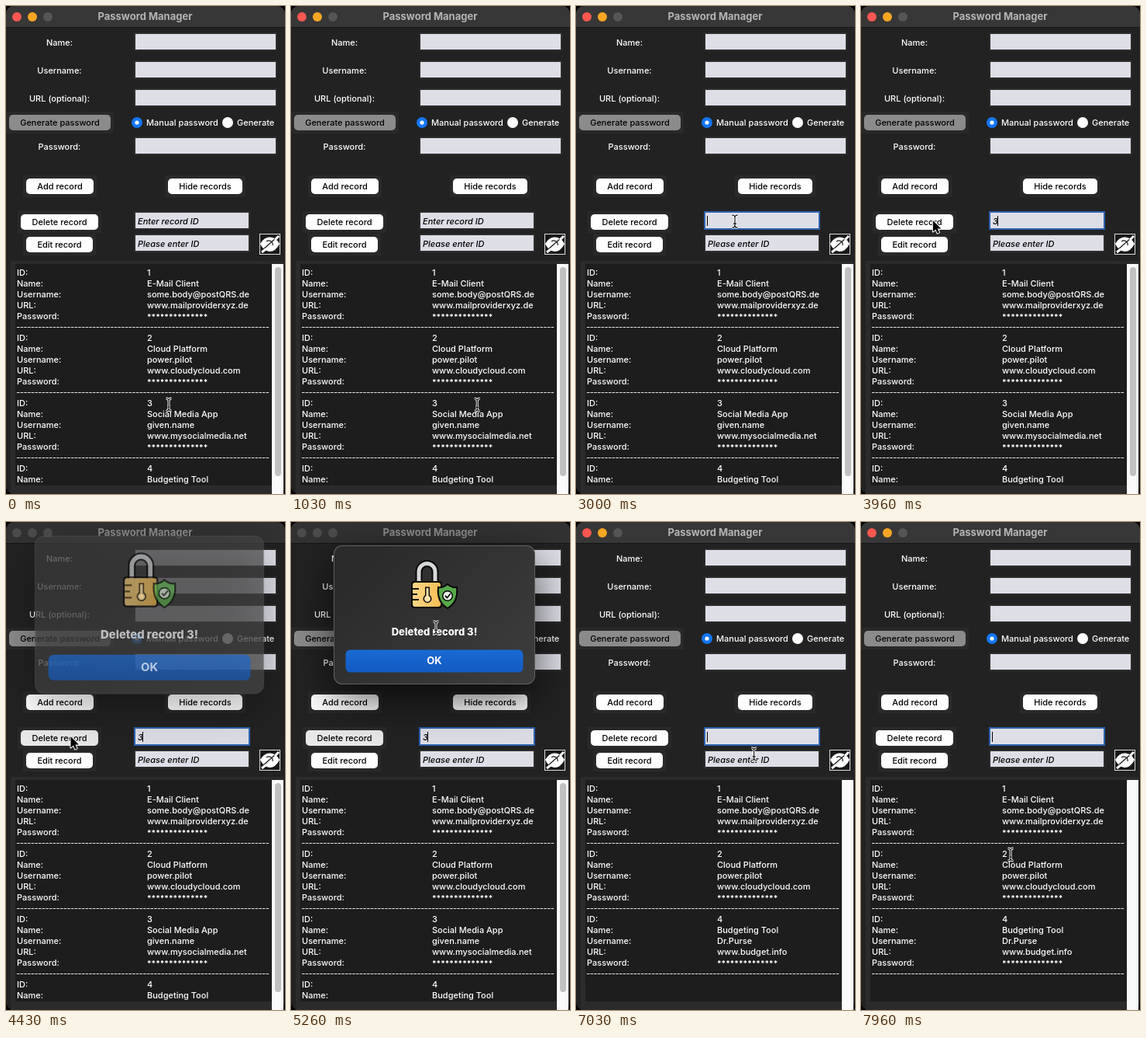
An HTML page with a canvas for the animation above (8000 ms loop, 360 by 628 pixels).

```html
<!DOCTYPE html>
<html lang="en">
<head>
<meta charset="utf-8">
<title>Password Manager</title>
<style>
  html, body { margin: 0; width: 100%; height: 100%; overflow: hidden; background: #000; }
  canvas { display: block; width: 360px; height: 628px; }
</style>
</head>
<body>
<canvas id="stage" width="360" height="628"></canvas>
<script>
const ctx = document.getElementById('stage').getContext('2d');
const LOOP = 8000;
const UI = '500 11px Inter, sans-serif';
const ITALIC = 'italic 500 11px Inter, sans-serif';
const BOLD = '700 13px Inter, sans-serif';
const HEAVY = '800 13px Inter, sans-serif';

const DIALOG_OPEN = 4370, DIALOG_CLOSE = 6570, DELETED = 6720;
const FOCUSED = 3000, TYPED = 3350;

// Pointer keyframes: time, x, y
const POINTER = [
  [0, 210, 513], [400, 224, 549], [830, 238, 528], [1200, 242, 502],
  [1660, 220, 526], [1780, 218, 522], [2160, 177, 402], [2560, 202, 284],
  [2900, 205, 277], [3500, 205, 279], [3940, 93, 276], [4250, 83.5, 276],
  [4650, 83.5, 276], [5240, 187, 136], [5500, 187, 138], [6100, 191.5, 172],
  [6650, 191.5, 172], [7150, 236, 320], [7600, 195, 428], [8000, 193, 428]
];

const RECORDS = [
  ['1', 'E-Mail Client', 'some.body@postQRS.de', 'www.mailproviderxyz.de'],
  ['2', 'Cloud Platform', 'power.pilot', 'www.cloudycloud.com'],
  ['3', 'Social Media App', 'given.name', 'www.mysocialmedia.net'],
  ['4', 'Budgeting Tool', 'Dr.Purse', 'www.budget.info']
];

const clamp = v => Math.max(0, Math.min(1, v));

function rect(x, y, w, h, fill) {
  ctx.fillStyle = fill;
  ctx.fillRect(x, y, w, h);
}

function rounded(x, y, w, h, r, fill) {
  ctx.beginPath();
  ctx.roundRect(x, y, w, h, r);
  ctx.fillStyle = fill;
  ctx.fill();
}

function disc(x, y, r, fill) {
  ctx.beginPath();
  ctx.arc(x, y, r, 0, 7);
  ctx.fillStyle = fill;
  ctx.fill();
}

function text(str, x, y, { color = '#fff', font = UI, align = 'left' } = {}) {
  ctx.font = font;
  ctx.textAlign = align;
  ctx.fillStyle = color;
  ctx.fillText(str, x, y);
}

function outline(path, color, width) {
  ctx.strokeStyle = color;
  ctx.lineWidth = width;
  ctx.stroke(path);
}

function gradient(x0, y0, x1, y1, from, to) {
  const g = ctx.createLinearGradient(x0, y0, x1, y1);
  g.addColorStop(0, from);
  g.addColorStop(1, to);
  return g;
}

function button(label, x, y, w, fill = '#fff') {
  rect(x - 4, y - 4, w + 8, 28, '#292929');
  rounded(x, y, w, 20, 5, fill);
  text(label, x + w / 2, y + 14, { color: '#000', align: 'center' });
}

function field(x, y, w, placeholder = '', focused = false) {
  rect(x - 2, y - 2, w + 4, 24, focused ? '#2d62b0' : '#2c2c2c');
  rect(x, y, w, 20, '#dedee7');
  if (placeholder) text(placeholder, x + 3, y + 15, { color: '#000', font: ITALIC });
}

function titleBar(active) {
  rounded(0, 0, 360, 28, [10, 10, 0, 0], active ? '#373737' : '#323232');
  rect(0, 27, 360, 1, '#151515');
  const lights = active ? ['#fc5750', '#f6a623', '#555'] : ['#4c4c4c', '#4c4c4c', '#4c4c4c'];
  lights.forEach((c, i) => disc(14 + 20 * i, 14, 6, c));
  text('Password Manager', 179.5, 18,
    { color: active ? '#b5b5b5' : '#8c8c8c', font: BOLD, align: 'center' });
}

function eyeButton() {
  rect(327, 293, 27, 27, '#ddd');
  rect(328, 294, 25, 25, '#181818');
  ctx.fillStyle = '#fff';
  ctx.fill(new Path2D('M328 306Q333 297 341 297.500Q349 298 353 306Q348 316 340 316Q332 315 328 306Z'));
  outline(new Path2D('M336 303a5 5 0 0 1 8 5'), '#181818', 1.2);
  outline(new Path2D('M332 313L349 298'), '#181818', 1.2);
  outline(new Path2D('M330 317L335 313M347 301L352 296'), '#fff', 3);
}

function form(t) {
  const rows = [['Name:', 36], ['Username:', 72], ['URL (optional):', 108], ['Password:', 170]];
  for (const [label, y] of rows) {
    text(label, 69, y + 15, { align: 'center' });
    field(167, y, 181);
  }

  button('Generate password', 4, 140, 131, '#8b8b8b');
  disc(169, 150, 7, '#1475f2');
  disc(169, 150, 2.6, '#fff');
  text('Manual password', 181, 154);
  disc(286, 150, 7, '#fff');
  text('Generate', 298, 154);

  const modal = t > DIALOG_OPEN && t < DELETED;
  button('Add record', 26, 222, 87);
  button('Hide records', 209, 222, 96);
  button('Delete record', 19, 268, 100, modal ? '#e8e8e8' : '#fff');
  button('Edit record', 26, 297, 86);

  const focused = t >= FOCUSED;
  const typed = t >= TYPED && t < DELETED;
  const value = focused ? (typed ? '3' : '') : 'Enter record ID';
  field(167, 266, 146, value, focused);
  if (focused && (modal || (t - FOCUSED) % 900 < 600)) rect(typed ? 176 : 169, 270, 1, 13, '#000');
  field(167, 295, 146, 'Please enter ID');
  eyeButton();
}

function recordList(t) {
  const deleted = t >= DELETED;
  rect(6, 328, 352, 300, '#2b2b2b');
  rect(12, 332, 331, 285, '#1d1d1d');
  rect(343, 332, 15, 296, '#fafafa');
  if (!deleted) rounded(347, 336, 8, 269, 4, '#c1c1c1');

  ctx.save();
  ctx.beginPath();
  ctx.rect(12, 332, 331, 284);
  ctx.clip();
  const labels = ['ID:', 'Name:', 'Username:', 'URL:', 'Password:'];
  RECORDS.filter(r => !deleted || r[0] !== '3').forEach((record, i) => {
    const top = 347 + 84 * i;
    labels.forEach((label, row) => {
      const y = top + 14 * row;
      text(label, 14, y);
      if (row < 4) text(record[row], 182, y);
      else text('*'.repeat(14), 182, y + 1, { font: '700 10px Inter, sans-serif' });
    });
    ctx.setLineDash([3.6, 1.06]);
    outline(new Path2D(`M14 ${top + 66.5}H340`), '#e4e4e4', 1);
    ctx.setLineDash([]);
  });
  ctx.restore();
}

function lockIcon() {
  const shackle = new Path2D('M165 79V64a10.500 10.500 0 0 1 21 0V79');
  outline(shackle, '#080808', 9);
  outline(shackle, '#d6d8da', 5);
  rounded(155, 76, 40, 35, 4, '#080808');
  rounded(157, 78, 36, 31, 3, gradient(157, 0, 193, 0, '#fbd687', '#f6bf55'));
  outline(new Path2D('M157 86h8M157 93h6M157 100h8'), '#1a1408', 2);
  // Keyhole: narrow stem above a round bulb
  const keyhole = new Path2D('M174.500 85H177.500V95A4 4 0 1 1 174.500 95Z');
  outline(keyhole, '#080808', 3);
  ctx.fillStyle = '#fbe3ad';
  ctx.fill(keyhole);
  const shield = new Path2D('M202 80Q208 85 214 84Q216 103 202 111Q188 103 190 84Q196 85 202 80Z');
  ctx.fillStyle = '#58a84b';
  ctx.fill(shield);
  outline(shield, '#080808', 2);
  disc(202, 95, 7, '#080808');
  disc(202, 95, 5.5, '#e8f0e5');
  outline(new Path2D('M199 95l2.500 2.500L206 92'), '#111', 1.8);
}

function dialog(t) {
  if (t < DIALOG_OPEN || t > DIALOG_CLOSE + 130) return;
  const p = clamp((t - DIALOG_OPEN) / 200);
  const scale = 1.2 - 0.2 * p;
  const fade = 1 - clamp((t - DIALOG_CLOSE) / 130);
  const pressed = t > 6380 && t < DIALOG_CLOSE;

  ctx.save();
  ctx.translate(184.5, 119);
  ctx.scale(scale, scale);
  ctx.translate(-184.5, -119);

  // The panel turns opaque more slowly than what it holds
  ctx.globalAlpha = (1 - (1 - p) ** 1.7) * fade;
  ctx.shadowColor = 'rgba(0,0,0,.65)';
  ctx.shadowBlur = 54;
  ctx.shadowOffsetY = 18;
  rounded(55, 30, 260, 179, 11, '#606060');
  ctx.shadowColor = 'transparent';
  rounded(56, 31, 258, 177, 10, gradient(100, 31, 270, 208, '#2a2a2a', '#3b3b3b'));

  ctx.globalAlpha = (1 - (1 - p) ** 3) * fade;
  lockIcon();
  text('Deleted record 3!', 185, 146, { font: HEAVY, align: 'center' });
  rounded(70.5, 164.5, 229, 29, 6, pressed
    ? gradient(0, 165, 0, 193, '#2796f3', '#1b83df')
    : gradient(0, 165, 0, 193, '#1a6ad5', '#125bc2'));
  text('OK', 185, 183, { font: BOLD, align: 'center' });
  ctx.restore();
}

function pointerAt(t) {
  const i = POINTER.findIndex(k => k[0] > t);
  const [t0, x0, y0] = POINTER[i - 1], [t1, x1, y1] = POINTER[i];
  const u = (t - t0) / (t1 - t0), e = u * u * (3 - 2 * u);
  return [x0 + (x1 - x0) * e, y0 + (y1 - y0) * e];
}

function pointer(t) {
  const [x, y] = pointerAt(t);
  const inField = x > 166 && x < 313 && y > 266 && y < 317;
  const inDialog = t > DIALOG_OPEN && t < DIALOG_CLOSE && x > 165 && y < 165;
  ctx.save();
  ctx.translate(x, y);
  if (y > 332 || inField || inDialog) {
    const beam = new Path2D('M-3.500 -8Q0 -8 0 -5Q0 -8 3.500 -8M0 -5V5M-3.500 8Q0 8 0 5Q0 8 3.500 8M-2 3H2');
    outline(beam, '#fff', 3);
    outline(beam, '#111', 1.2);
  } else {
    const arrow = new Path2D('M0 0V14.500L3.400 11.400L5.600 16.500L8.200 15.400L6 10.400H10.500Z');
    ctx.lineJoin = 'round';
    outline(arrow, '#fff', 2);
    ctx.fillStyle = '#000';
    ctx.fill(arrow);
  }
  ctx.restore();
}

function draw(t) {
  rect(0, 0, 360, 628, '#000');
  rounded(0, 0, 360, 628, 10, '#222');
  titleBar(t < DIALOG_OPEN || t > DIALOG_CLOSE + 130);
  form(t);
  recordList(t);
  dialog(t);
  pointer(t);
}

const start = performance.now();
function tick() {
  draw((performance.now() - start) % LOOP);
  requestAnimationFrame(tick);
}
tick();
</script>
</body>
</html>
```
